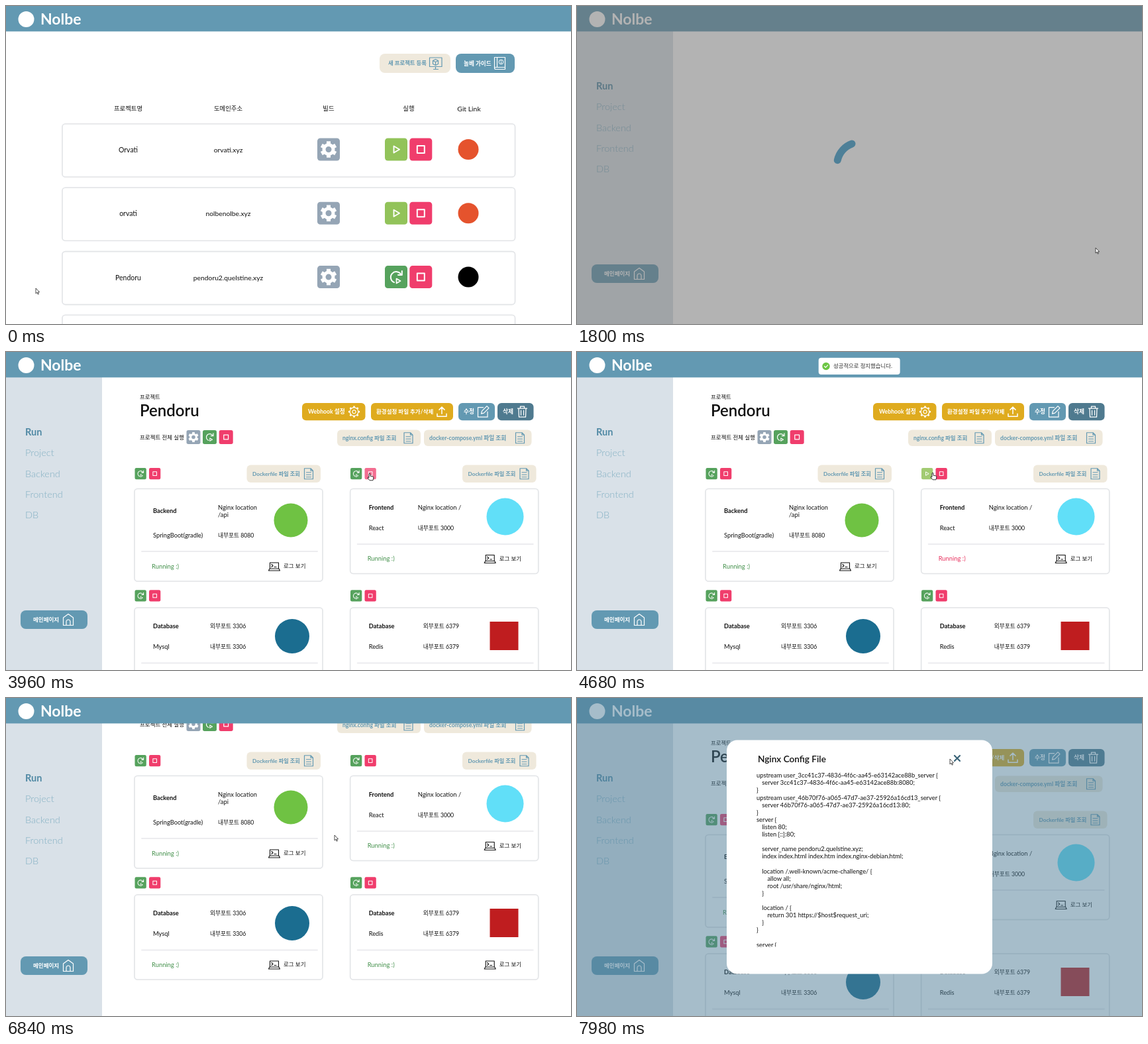
Recreate the animation shown at these times as an HTML page. Size 853 by 480 pixels, loop 8 s.

```html
<!DOCTYPE html>
<html lang="ko">
<head>
<meta charset="utf-8">
<title>Nolbe</title>
<style>
html, body { margin: 0; width: 100%; height: 100%; overflow: hidden; background: #fff; }
svg { display: block; width: 100vw; height: 100vh; }
text { font-family: Lato, 'Noto Sans CJK KR', 'Noto Sans CJK', sans-serif; white-space: pre; }
.line { fill: none; stroke-linecap: round; stroke-linejoin: round; }
</style>
</head>
<body>
<svg id="stage" viewBox="0 0 853 480" preserveAspectRatio="none"></svg>
<script>
const BLUE = '#6399b2', DARK = '#4f7a8f', GOLD = '#dfab1e', BEIGE = '#efe9dc';
const GREEN = '#56a25d', LIME = '#92c35a', PINK = '#f03d6c', GREY = '#95a5b5';

// Text whose vertical middle is cy
const text = (x, cy, str, size = 9.2, fill = '#111', weight = 400, anchor = 'start', id = '') =>
  `<text x="${x}" y="${cy + size * .35}" font-size="${size}" fill="${fill}" font-weight="${weight}" text-anchor="${anchor}"${id && ` id="${id}"`}>${str}</text>`;
const box = (x, y, w, h, r, fill, extra = '') =>
  `<rect x="${x}" y="${y}" width="${w}" height="${h}" rx="${r}" fill="${fill}" ${extra}/>`;
const dot = (x, y, r, fill) => `<circle cx="${x}" cy="${y}" r="${r}" fill="${fill}"/>`;
const path = (d, color = '#fff', width = 1.3, extra = '') =>
  `<path class="line" d="${d}" stroke="${color}" stroke-width="${width}" ${extra}/>`;
const at = (x, y, body, scale = 1) => `<g transform="translate(${x} ${y}) scale(${scale})">${body}</g>`;
const group = (id, body, extra = '') => `<g id="${id}" ${extra}>${body}</g>`;

const tooth = (n, r0, r1, width, color) => Array.from({ length: n }, (_, i) =>
  `<path d="M0 ${-r0}V${-r1}" stroke="${color}" stroke-width="${width}" transform="rotate(${i * 360 / n})"/>`).join('');

// Glyphs of the square buttons, drawn for a 34 px button around its middle
const glyphs = {
  gear: [GREY, '<circle r="7" fill="none" stroke="#fff" stroke-width="5"/>' + tooth(6, 8, 12.3, 6, '#fff')],
  play: [LIME, path('M-3.5-5L5 0L-3.5 5Z', '#fff', 1.9)],
  stop: [PINK, path('M-5.5-5.5H5.5V5.5H-5.5Z', '#fff', 2)],
  restart: [GREEN, path('M-3 8A8.3 8.3 0 1 1 7.5-3.5M8.8-9V-3H3', '#fff', 2) + path('M.5 2.5L6.5 6L.5 9.5Z', '#fff', 1.7)]
};
const square = (x, y, size, kind, id = '') => {
  const [fill, glyph] = glyphs[kind];
  return `<g${id && ` id="${id}"`}>${box(x, y, size, size, size * .13, fill)}${at(x + size / 2, y + size / 2, glyph, size / 34)}</g>`;
};

const icons = {
  cog: c => `<circle r="2.6" fill="none" stroke="${c}" stroke-width="1.2"/><circle r="6.3" fill="none" stroke="${c}" stroke-width="1.2"/>` + tooth(8, 6.3, 8.6, 2.6, c),
  upload: c => path('M-7 3V7H7V3M0 3V-7M-4-3L0-7L4-3', c, 1.5),
  pencil: c => path('M0-6.5H-8V8H6.5V0M-3 3L-2-1L5.5-8.5L8.5-5.5L1 2Z', c, 1.2),
  trash: c => path('M-7-5H7M-3-5V-8H3V-5M-5.5-5L-5 8H5L5.5-5M-2-2V5M2-2V5', c, 1.3),
  doc: c => path('M-6.5-8H3L6.5-4.5V8H-6.5ZM3-8V-4.5H6.5M-3.5-2H3.5M-3.5 1.5H3.5M-3.5 5H3.5', c, 1.2),
  house: c => path('M-7.5 8.5V-3L0-8.5L7.5-3V8.5ZM-3 8.5V3A3 3 0 0 1 3 3V8.5', c, 1.2),
  screen: c => path('M-9-8.5H9.5V5H-9ZM-3 9H4M0 5V9M0-6L4-4V1L0 3L-4 1V-4ZM-4-4L0-2L4-4M0-2V3', c, 1.2),
  book: c => path('M-8-9H8V9H-6A2 2 0 0 1-8 7ZM-8 6H8M-4-9V6', c, 1.2) + `<circle cx="2" cy="-2" r="3.3" fill="none" stroke="${c}"/>` + path('M2-2.5V0M2-4V-3.9', c, 1),
  laptop: c => path('M-6.5-6H6.5V3H-6.5ZM-8.5 6H8.5L7 3H-7ZM-4-3.5L-2-1.5L-4 .5M0 .5H3', c, 1.1)
};
// Wide button: label at tx, icon middle at ix
const button = (x, y, w, h, fill, color, tx, label, icon, ix, size = 8.7, r = 6) =>
  box(x, y, w, h, r, fill) + text(tx, y + h / 2, label, size, color, 700) + at(ix, y + h / 2, icons[icon](color));

const frame = (x, y, w, h) =>
  box(x - 1, y - 1, w + 2, h + 2, 6, '#f3f4f5') + box(x, y, w, h, 4.5, '#fff', 'stroke="#e3e5e8" stroke-width="1.6"');

function listPage() {
  const mid = (x, y, s, size) => text(x, y, s, size, '#111', 400, 'middle');
  const rows = [
    ['Orvati', 'orvati.xyz', 'play', '#e5532d'],
    ['orvati', 'nolbenolbe.xyz', 'play', '#e5532d'],
    ['Pendoru', 'pendoru2.quelstine.xyz', 'restart', '#000']
  ];
  return button(564, 72, 107, 29, BEIGE, BLUE, 577, '새 프로젝트 등록', 'screen', 648.5, 8.4, 8) +
    button(679, 72, 89, 29, BLUE, '#fff', 691, '놀베 가이드', 'book', 745.5, 8.6, 8) +
    [[184.5, '프로젝트명'], [335.5, '도메인주소'], [487, '빌드'], [608, '실행']].map(([x, s]) => mid(x, 155, s, 9.4)).join('') +
    mid(699, 155, 'Git Link', 10.4) +
    rows.map(([name, domain, run, mark], i) => {
      const y = 178 + i * 96.3;
      return frame(85, y, 683.5, 80) + mid(184.5, y + 39.5, name, 10.5) + mid(335.5, y + 39.5, domain, 10.3) +
        square(470, y + 21.5, 34, 'gear') + square(572, y + 21.5, 34, run) + square(609.3, y + 21.5, 34, 'stop') +
        dot(698, y + 38.5, 15.5, mark);
    }).join('') + frame(85, 466.5, 683.5, 80);
}

function serviceCard(id, x, y, h, rows, split, mark) {
  const bottom = y + h;
  return group(id, frame(x, y, 284, h) +
    rows.map(([dx, dy, s, bold]) => text(x + dx, y + dy, s, /[가-힣]/.test(s) ? 8.7 : 9.3, '#111', bold ? 700 : 400)).join('') +
    path(`M${x + 11} ${y + split}H${x + 276}`, '#ececef', 2) +
    text(x + 26, bottom - 22.5, 'Running :)', 9.4, '#43904b', 400, 'start', id + 'State') +
    at(x + 211, bottom - 22, icons.laptop('#111')) + text(x + 225, bottom - 22.5, '로그 보기', 8.5) + mark);
}

function projectPage() {
  const pair = (x, y) => square(x, y, 17.3, 'restart') + square(x + 21.5, y, 17.3, 'stop');
  const docker = x => button(x, 170.5, 111.5, 26.5, BEIGE, BLUE, x + 8.5, 'Dockerfile 파일 조회', 'doc', x + 93.5, 8.2);
  return text(202, 68, '프로젝트', 8.4) + text(202, 89, 'Pendoru', 24, '#111', 600) +
    text(202, 129, '프로젝트 전체 실행', 8.5) +
    square(272.5, 118, 21, 'gear') + square(297, 118, 21, 'restart') + square(321.7, 118, 21, 'stop') +
    button(447, 77, 95.5, 26.3, GOLD, '#fff', 456, 'Webhook 설정', 'cog', 525.5) +
    button(551, 77, 124, 26.3, GOLD, '#fff', 559, '환경설정 파일 추가/삭제', 'upload', 658, 8.5) +
    button(683, 77, 55, 26.3, BLUE, '#fff', 691, '수정', 'pencil', 720.5) +
    button(742, 77, 54.5, 26.3, DARK, '#fff', 750, '삭제', 'trash', 779.5) +
    button(500, 117.5, 126, 24.5, BEIGE, BLUE, 508, 'nginx.config 파일 조회', 'doc', 607.5, 8.5) +
    button(631, 117.5, 162.5, 24.5, BEIGE, BLUE, 639, 'docker-compose.yml 파일 조회', 'doc', 776, 8.7) +
    docker(363.5) + docker(689) +
    pair(194.5, 175) + pair(194.5, 359.3) + pair(520, 359.3) +
    square(520, 175, 17.3, 'restart', 'rerun') + square(520, 175, 17.3, 'play', 'run') + square(541.5, 175, 17.3, 'stop', 'halt') +
    serviceCard('backend', 194, 206.5, 139.5, [[28, 33.5, 'Backend', 1], [126, 28, 'Nginx location'], [126, 39, '/api'],
      [28, 70, 'SpringBoot(gradle)'], [126, 70, '내부포트 8080']], 94.5, dot(430, 254, 25.5, '#6fc243')) +
    serviceCard('frontend', 519.7, 206.5, 128, [[28, 28, 'Frontend', 1], [102, 28, 'Nginx location /'],
      [28, 59, 'React'], [102, 59, '내부포트 3000']], 83.5, dot(753.5, 248.5, 28, '#61dff8')) +
    serviceCard('mysql', 194, 386, 128, [[28, 28, 'Database', 1], [114, 28, '외부포트 3306'],
      [28, 59, 'Mysql'], [114, 59, '내부포트 3306']], 83.5, dot(432, 429, 26, '#1b6d90')) +
    serviceCard('redis', 519.7, 386, 128, [[28, 28, 'Database', 1], [110, 28, '외부포트 6379'],
      [28, 59, 'Redis'], [110, 59, '내부포트 6379']], 83.5, box(730.5, 407, 43, 43, 0, '#bf1d1f'));
}

const sidebar = () => box(0, 38, 145, 442, 0, '#d9e1e8') +
  ['Run', 'Project', 'Backend', 'Frontend', 'DB'].map((s, i) =>
    text(29, 121 + i * 31.3, s, 14.5, i ? '#83b0c3' : '#5089a4', i ? 300 : 700)).join('') +
  button(22, 390, 101, 28, BLUE, '#fff', 41, '메인페이지', 'house', 94, 8.5, 8);

function modal() {
  const api = '3cc41c37-4836-4f6c-aa45-e63142ace88b', web = '46b70f76-a065-47d7-ae37-25926a16cd13';
  const code = `upstream user_${api}_server {
 server ${api}:8080;
}
upstream user_${web}_server {
 server ${web}:80;
}
server {
 listen 80;
 listen [::]:80;

 server_name pendoru2.quelstine.xyz;
 index index.html index.htm index.nginx-debian.html;

 location /.well-known/acme-challenge/ {
  allow all;
  root /usr/share/nginx/html;
 }

 location / {
  return 301 https://$host$request_uri;
 }
}

server {`;
  const lines = code.split('\n').map((line, i) => {
    const body = line.trimStart();
    return text(271 + 8.2 * (line.length - body.length), 117 + i * 11.1, body, 9.35);
  }).join('');
  return box(0, 0, 853, 480, 0, 'rgb(78,125,149)', 'opacity=".5"') + box(226, 63.5, 401, 353, 16, '#fff') +
    text(273, 92, 'Nginx Config File', 13.6, '#111', 600) + path('M570 87L578 95M578 87L570 95', '#3b6478', 2.2) +
    `<clipPath id="codeArea"><rect x="260" y="105" width="340" height="270.5"/></clipPath><g clip-path="url(#codeArea)">${lines}</g>`;
}

const polar = deg => [34 * Math.cos(deg * Math.PI / 180), 34 * Math.sin(deg * Math.PI / 180)].join(' ');
const loader = () => box(0, 0, 853, 480, 0, 'rgb(105,105,105)', 'opacity=".5"') +
  at(426.5, 240, group('spinner', path(`M${polar(192)}A34 34 0 0 1 ${polar(250)}`, '#4e8098', 11)));

const $ = id => document.getElementById(id);
$('stage').innerHTML = box(0, 0, 853, 480, 0, '#fff') +
  group('list', listPage()) +
  group('project', group('content', projectPage()) + sidebar()) +
  box(0, 0, 853, 38.4, 0, BLUE) + dot(30.5, 20, 12, '#fff') + text(52, 19.7, 'Nolbe', 23, '#fff', 700) +
  group('loader', loader()) + group('modal', modal()) +
  group('toast', box(364.7, 8.8, 123, 25.2, 4, '#fff') + dot(376, 21.5, 5.7, '#6cc644') +
    path('M373.5 21.5L375.3 23.3L378.6 19.9', '#fff', 1.2) + text(387, 21.3, '', 8.4, '#333', 400, 'start', 'message')) +
  group('arrow', '<path d="M0 0V8L1.9 6.3L3.2 9.2L4.4 8.7L3.2 5.9H5.6Z" fill="#fff" stroke="#222" stroke-width=".8"/>') +
  group('hand', '<path d="M-1 1Q0-.6 1 1V4.2L5 5Q6.2 5.4 5.8 7L5 10.8H0L-3 7Q-3.2 5.5-1 6.6Z" fill="#fff" stroke="#222" stroke-width=".9"/>');

const LOOP = 8000;
const loads = [[1320, 2220], [4080, 4500], [4920, 5400]];
const toasts = [[4500, 5300, '성공적으로 정지했습니다.'], [5400, 6400, '성공적으로 실행했습니다.']];
const cursorPath = [[0, 45, 426], [300, 45, 426], [840, 330, 405], [1320, 600, 395], [1720, 783, 365], [2640, 783, 365],
  [3360, 660, 350], [3700, 562, 240], [3860, 549, 183], [4080, 549, 183], [4680, 537, 182], [4780, 528, 181],
  [4960, 528, 181], [5500, 569, 212], [6000, 569, 212], [6600, 496, 207], [7200, 496, 207], [7560, 557, 127],
  [7700, 557, 127], [7940, 563, 92], [8000, 563, 92]];
const scrollPath = [[0, 0], [6740, 0], [6830, 89], [7200, 89], [7340, 0], [8000, 0]];

const within = (t, [from, to]) => t >= from && t < to;
const smooth = k => k * k * (3 - 2 * k);
function follow(keys, t) {
  const i = keys.findIndex(key => key[0] > t), a = keys[i - 1], b = keys[i];
  const k = smooth((t - a[0]) / (b[0] - a[0]));
  return a.slice(1).map((v, j) => v + (b[j + 1] - v) * k);
}
const show = (id, on) => $(id).setAttribute('display', on ? 'inline' : 'none');
const move = (id, value) => $(id).setAttribute('transform', value);

function render(t) {
  const [x, y] = follow(cursorPath, t), [scroll] = follow(scrollPath, t);
  const onProject = t >= 1320, ready = t >= 2220, stopped = within(t, [4500, 5400]), modalOpen = t >= 7680;
  const loading = loads.some(span => within(t, span));
  const over = (left, top, w, h) => !loading && !modalOpen && x >= left && x <= left + w && y >= top - scroll && y <= top - scroll + h;

  show('list', !onProject);
  show('project', onProject);
  show('content', ready);
  show('loader', loading);
  show('modal', modalOpen);
  move('spinner', `rotate(${(t - 1800) * .36})`);
  move('content', `translate(0 ${-scroll})`);

  const overRun = ready && over(520, 175, 17.5, 17.5), overHalt = ready && over(541, 175, 18, 17.5);
  const overCard = ready && over(519.7, 206.5, 284, 128);
  show('run', stopped);
  show('rerun', !stopped);
  $('run').setAttribute('opacity', overRun ? .85 : 1);
  $('rerun').setAttribute('opacity', overRun ? .85 : 1);
  $('halt').setAttribute('opacity', overHalt ? .75 : 1);
  $('frontend').setAttribute('opacity', overCard ? .8 : 1);
  move('frontend', overCard ? 'translate(661.7 270.5) scale(1.008) translate(-661.7 -270.5)' : '');
  $('frontendState').setAttribute('fill', stopped ? '#e8325f' : '#43904b');

  const toast = toasts.find(span => within(t, span));
  show('toast', toast);
  if (toast) {
    const k = smooth(Math.min(1, (t - toast[0]) / 160, (toast[1] - t) / 160));
    $('message').textContent = toast[2];
    $('toast').setAttribute('opacity', k);
    move('toast', `translate(0 ${(k - 1) * 30})`);
  }

  const pointing = overRun || overHalt || (ready && over(500, 117.5, 126, 24.5)) || (!onProject && over(85, 370.5, 683, 80));
  show('hand', pointing);
  show('arrow', !pointing);
  move('hand', `translate(${x} ${y})`);
  move('arrow', `translate(${x} ${y})`);
}

const start = performance.now();
function tick(now) {
  render(Math.max(0, now - start) % LOOP);
  requestAnimationFrame(tick);
}
render(0);
requestAnimationFrame(tick);
</script>
</body>
</html>
```
